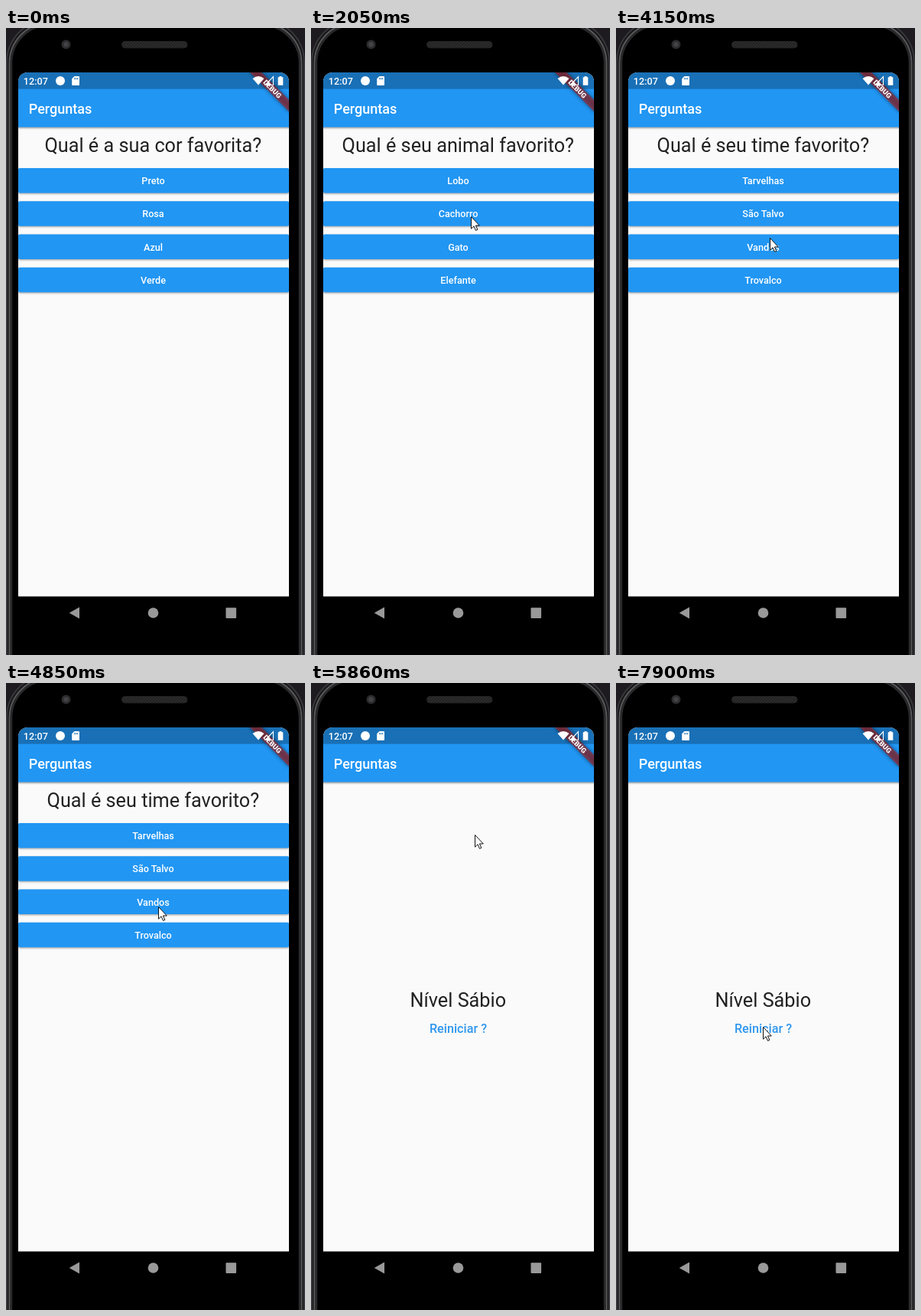
An HTML page that plays this animation: 391x819 px, repeating every 8000 ms.

```html
<!DOCTYPE html>
<html lang="pt">
<head>
<meta charset="utf-8">
<title>Perguntas</title>
<style>
html, body { margin: 0; width: 100%; height: 100%; overflow: hidden; background: #1d1a20; }
svg { position: absolute; left: 0; top: 0; display: block; }
text { font-family: Roboto, sans-serif; }
.medium { font-weight: 500; fill: #fff; }
.mid { text-anchor: middle; }
.heading { font-size: 25.24px; fill: #212121; }
.label { font-size: 12.62px; }
</style>
</head>
<body>
<svg width="391" height="819" viewBox="0 0 391 819">
  <defs>
    <clipPath id="screen"><path d="M16 742.600V70a12 12 0 0 1 12-12H358a12 12 0 0 1 12 12V742.600Z"/></clipPath>
    <clipPath id="rowClip"><rect id="rowBox" x="16" width="354" height="32.5" rx="1.8"/></clipPath>
    <filter id="blur" x="-20%" y="-60%" width="140%" height="220%"><feGaussianBlur stdDeviation="1.3"/></filter>
    <filter id="soft" x="-20%" y="-60%" width="140%" height="220%"><feGaussianBlur stdDeviation="2.7"/></filter>
    <pattern id="mesh" width="4" height="4" patternUnits="userSpaceOnUse">
      <rect width="4" height="4" fill="#2b2b2b"/><path d="M0 4L4 0" stroke="#1c1c1c"/>
    </pattern>
  </defs>

  <!-- phone body -->
  <g fill="none">
    <rect x="1" y="-11" width="389" height="920" rx="56" fill="#161617" stroke="#38373b" stroke-width="2"/>
    <rect x="4.5" y="-7" width="382" height="920" rx="53" stroke="#58585b" stroke-width="2"/>
    <rect x="7" y="-4" width="377" height="920" rx="50" fill="#000" stroke="#29292b" stroke-width="2.5"/>
  </g>
  <rect x="151.500" y="17.500" width="85.500" height="8.500" rx="4" fill="url(#mesh)" stroke="#222"/>
  <circle cx="78.500" cy="21.500" r="6" fill="#2c2c2e"/>
  <circle cx="78.500" cy="21.500" r="3.200" fill="#434347"/>

  <g clip-path="url(#screen)">
    <rect x="16" y="58" width="354" height="685" fill="#fafafa"/>
    <g id="quiz">
      <text id="question" class="heading mid" x="192.300" y="162"/>
      <g id="rows"/>
    </g>
    <g id="result">
      <text class="heading mid" x="192.300" y="423">Nível Sábio</text>
      <text class="medium mid" x="192.500" y="457" font-size="16.22" style="fill:#2f97ee">Reiniciar ?</text>
    </g>

    <rect x="10" y="80" width="366" height="51" fill="#000" opacity=".35" filter="url(#blur)"/>
    <rect x="16" y="79" width="354" height="50.500" fill="#2196f3"/>
    <rect x="16" y="58" width="354" height="21.600" fill="#1970b6"/>
    <text class="medium" x="29.800" y="111.500" font-size="18.03">Perguntas</text>

    <g transform="translate(370 58) rotate(45)">
      <rect x="-37" y="25.240" width="74" height="10.820" fill="#000" opacity=".5" filter="url(#soft)"/>
      <rect x="-37" y="25.240" width="74" height="10.820" fill="#b71c1c" opacity=".55"/>
      <text class="mid" y="33.900" font-size="9.200" font-weight="900" fill="#fff">DEBUG</text>
    </g>

    <!-- status bar -->
    <g fill="#fff">
      <text class="medium" x="22.800" y="73.500" font-size="12.620">12:07</text>
      <circle cx="71" cy="69" r="6"/>
      <path d="M89.500 63H95q1 0 1 1V74q0 1-1 1H87.200q-1 0-1-1V66.300Z"/>
      <path d="M89.700 65v2.300M91.700 65v2.300M93.700 65v2.300" stroke="#1970b6"/>
      <path d="M322.500 66Q330 60 337.500 66L330 74.500Z"/>
      <path d="M349.500 63.500V74.500H339Z" fill="none" stroke="#fff" stroke-width="1.100"/>
      <path d="M344.500 69V74.500H339Z"/>
      <path d="M357.500 63H360.500V64.200H362.300V74.800H355.700V64.200H357.500Z"/>
    </g>
  </g>

  <!-- navigation bar -->
  <g fill="#999">
    <path d="M82.700 764L96 756.500V771.500Z"/>
    <circle cx="192.500" cy="764" r="6.800"/>
    <rect x="287.500" y="757.300" width="13.600" height="13.600" rx="1"/>
  </g>

  <circle id="press" r="12" fill="#ff0" opacity=".55"/>
  <path id="cursor" d="M.5 .5V16.200L4 12.800L6.500 18.400L8.800 17.400L6.400 12H11.300Z" stroke-width="1"/>
</svg>

<script>
const LOOP = 8000, STEP = 77, PITCH = 43.27;

const pages = [
  ['Qual é a sua cor favorita?', 'Preto', 'Rosa', 'Azul', 'Verde'],
  ['Qual é seu animal favorito?', 'Lobo', 'Cachorro', 'Gato', 'Elefante'],
  ['Qual é seu time favorito?', 'Tarvelhas', 'São Talvo', 'Vandos', 'Trovalco']
];

// start time, number of steps, way points
const moves = [
  [440, 11, [[296, 779], [262, 560], [199, 300], [212, 260]]],
  [1280, 2, [[211, 255], [210, 250]]],
  [1530, 1, [[209, 246]]],
  [3920, 4, [[207, 253], [201, 274]]],
  [4390, 11, [[200, 285], [193, 333], [204, 250], [214, 198]]],
  [6410, 11, [[213, 212], [195, 330], [186, 400], [187, 431]]],
  [7280, 3, [[187, 440], [188, 459]]],
  [7730, 3, [[189, 456], [192, 449]]]
];

const taps = [
  { row: 1, x: 209, y: 246, down: 1530, up: 1820, ink: 1740, show: 1820, end: 2050 },
  { row: 1, x: 208, y: 246, down: 3140, up: 3370, ink: 3140, show: 3140, end: 3600 },
  { row: 0, x: 214, y: 198, down: 5490, up: 5780, ink: 5472, show: 5490, end: 5780 }
];

const $ = id => document.getElementById(id);
const rowY = i => 183 + i * PITCH;
const toggle = (el, on) => el.setAttribute('display', on ? 'inline' : 'none');

function set(el, attrs) {
  for (const key in attrs) el.setAttribute(key, attrs[key]);
  return el;
}

function add(parent, tag, attrs) {
  const el = document.createElementNS('http://www.w3.org/2000/svg', tag);
  return parent.appendChild(set(el, attrs));
}

const box = { x: 16, width: 354, height: 32.5, rx: 1.8 };
const rows = $('rows');
const shadows = [], labels = [];
for (let i = 0; i < 4; i++) {
  const y = rowY(i);
  shadows.push(add(rows, 'rect', { ...box, y: y + 1.2, opacity: .33, filter: 'url(#blur)' }));
  add(rows, 'rect', { ...box, y, fill: '#2196f3' });
}
const ink = add(rows, 'g', { 'clip-path': 'url(#rowClip)', fill: '#fff' });
const glow = add(ink, 'rect', box);
const splash = add(ink, 'circle', {});
for (let i = 0; i < 4; i++) {
  labels.push(add(rows, 'text', { class: 'medium mid label', x: 192.5, y: rowY(i) + 21 }));
}

function along(points, u) {
  const last = points.length - 1;
  const i = Math.min(Math.floor(u * last), last - 1);
  if (i < 0) return points[0];
  const f = u * last - i;
  return points[i].map((v, k) => v + (points[i + 1][k] - v) * f);
}

function cursorAt(t) {
  const move = moves.filter(m => m[0] <= t).pop();
  if (!move) return null;
  const [start, count, points] = move;
  const u = count > 1 ? Math.min(Math.floor((t - start) / STEP) / (count - 1), 1) : 0;
  return along(points, u * u * (3 - 2 * u));
}

let page = -1;
function showPage(n) {
  if (n === page) return;
  page = n;
  toggle($('quiz'), n < pages.length);
  toggle($('result'), n === pages.length);
  if (n < pages.length) {
    const [title, ...answers] = pages[n];
    $('question').textContent = title;
    answers.forEach((text, i) => labels[i].textContent = text);
  }
}

function drawInk(t) {
  const tap = taps.find(p => t >= p.show && t < p.end);
  toggle(ink, tap);
  shadows.forEach((s, i) => {
    const raised = tap && tap.row === i && t >= tap.ink + 150;
    set(s, { filter: raised ? 'url(#soft)' : 'url(#blur)', y: rowY(i) + (raised ? 3 : 1.2) });
  });
  if (!tap) return;
  const age = Math.floor((t - tap.ink) / STEP) * STEP;
  const y = rowY(tap.row);
  const fade = tap.end - t < STEP ? .5 : 1;
  set($('rowBox'), { y });
  set(glow, { y, opacity: .145 * Math.min(1, age / 160) * fade });
  set(splash, { cx: tap.x, cy: tap.y, r: age * .224, opacity: .11 * fade });
}

function draw(now) {
  const t = now % LOOP;
  showPage(taps.filter(p => t >= p.up).length);
  drawInk(t);

  const at = cursorAt(t), cursor = $('cursor'), press = $('press');
  const held = taps.some(p => t >= p.down && t < p.up);
  toggle(cursor, at);
  toggle(press, held);
  if (at) {
    const [x, y] = at.map(Math.round);
    set(cursor, {
      transform: `translate(${x} ${y})`,
      fill: held ? '#ffffa0' : '#fff',
      stroke: held ? '#4d7a1c' : '#111'
    });
    set(press, { cx: x, cy: y });
  }
}

const origin = performance.now();
function tick() {
  draw(performance.now() - origin);
  requestAnimationFrame(tick);
}
tick();
</script>
</body>
</html>
```
